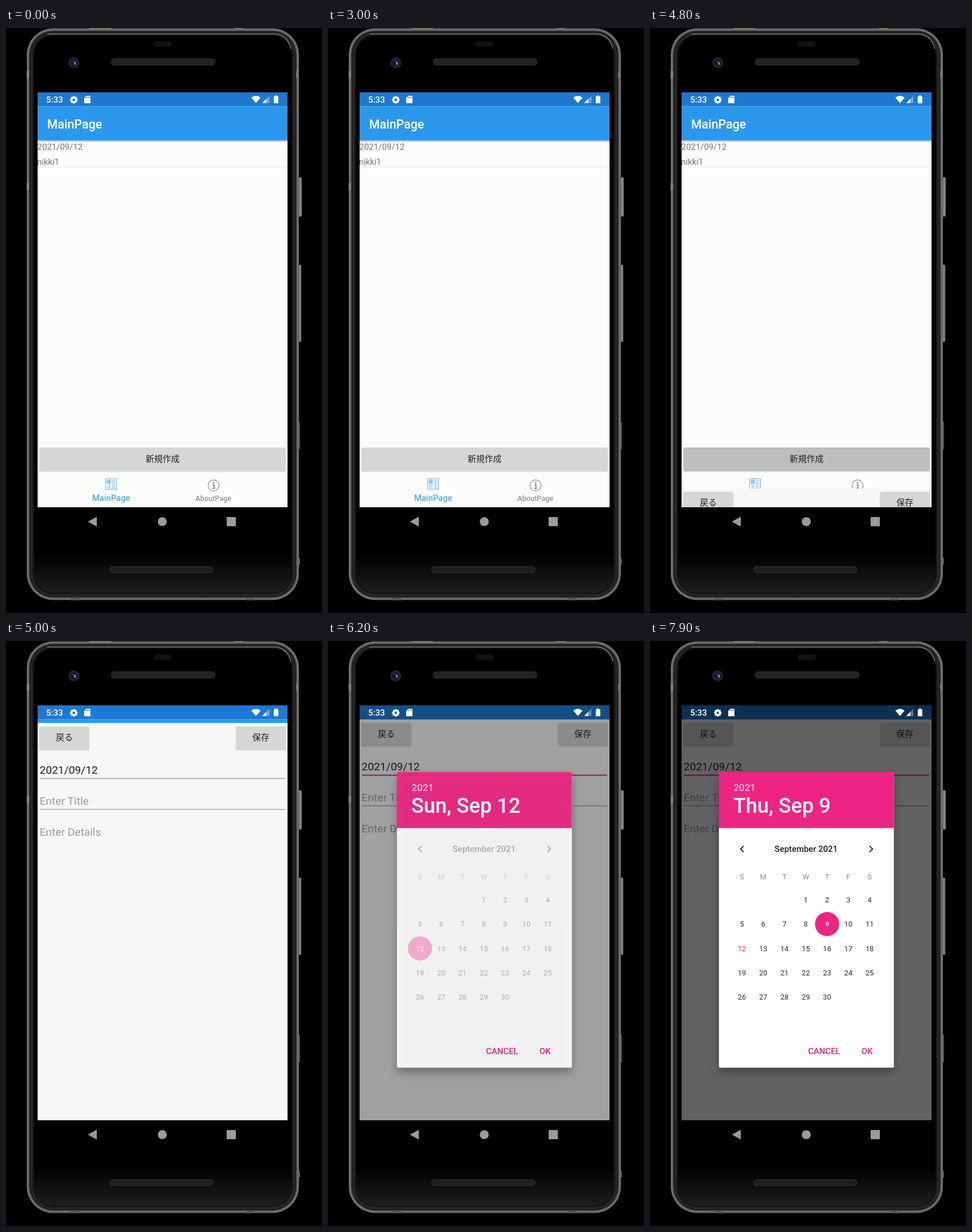
Recreate the animation shown at these times as an HTML page. Size 550 by 1018 pixels, loop 8 s.

```html
<!DOCTYPE html>
<html lang="ja">
<head>
<meta charset="utf-8">
<title>Diary app</title>
<style>
html, body { margin: 0; width: 100%; height: 100%; overflow: hidden; background: #000; }
svg { display: block; width: 100vw; height: 100vh; }
text { font-family: Roboto, "Noto Sans CJK JP", "Noto Sans CJK", sans-serif; white-space: pre; }
.m { font-weight: 500; }
</style>
</head>
<body>
<svg id="stage" viewBox="0 0 550 1018" xmlns="http://www.w3.org/2000/svg">
  <defs>
    <linearGradient id="face" x1="0" x2="0" y1="0" y2="1">
      <stop offset="0" stop-color="#000"/><stop offset=".93" stop-color="#000"/>
      <stop offset="1" stop-color="#1e1e1e"/>
    </linearGradient>
    <linearGradient id="key" x1="0" x2="1" y1="0" y2="0">
      <stop offset="0" stop-color="#3a3a3a"/><stop offset=".5" stop-color="#959595"/>
      <stop offset="1" stop-color="#606060"/>
    </linearGradient>
    <linearGradient id="drop" x1="0" x2="0" y1="0" y2="1">
      <stop offset="0" stop-color="#000" stop-opacity=".32"/>
      <stop offset="1" stop-color="#000" stop-opacity="0"/>
    </linearGradient>
    <filter id="soft" x="-20%" y="-20%" width="140%" height="140%"><feGaussianBlur stdDeviation="8"/></filter>
    <filter id="blur" x="-10%" y="-30%" width="120%" height="160%"><feGaussianBlur stdDeviation="1.2"/></filter>
    <clipPath id="screen"><rect x="55" y="112" width="435" height="722"/></clipPath>
    <clipPath id="body"><rect x="55" y="136.5" width="435" height="697.5"/></clipPath>
  </defs>
  <rect width="550" height="1018" fill="#000"/>
  <g id="phone"></g>
  <g clip-path="url(#screen)">
    <rect x="55" y="112" width="435" height="25" fill="#1f78d0"/>
    <g clip-path="url(#body)">
      <g id="home"></g>
      <g id="edit"></g>
    </g>
    <rect id="dim" x="55" y="112" width="435" height="722" fill="#000"/>
    <g id="status" fill="#fff"></g>
  </g>
  <g id="dialog"></g>
</svg>
<script>
const $ = id => document.getElementById(id);
const PINK = '#ed2582', BLUE = '#2b98ec';

const text = (x, y, size, fill, str, more = '') =>
  `<text x="${x}" y="${y}" font-size="${size}" fill="${fill}" ${more}>${str}</text>`;
const mid = (x, y, size, fill, str, more = '') =>
  text(x, y, size, fill, str, 'text-anchor="middle" ' + more);
const rect = (x, y, w, h, fill, more = '') =>
  `<rect x="${x}" y="${y}" width="${w}" height="${h}" fill="${fill}" ${more}/>`;
const circle = (x, y, r, fill, more = '') =>
  `<circle cx="${x}" cy="${y}" r="${r}" fill="${fill}" ${more}/>`;
const path = (d, more) => `<path d="${d}" ${more}/>`;
const button = (x, y, w, h, label, id = '') =>
  rect(x, y + 1, w, h, '#000', 'rx="2" opacity=".2" filter="url(#blur)"') +
  rect(x, y, w, h, '#d5d6d6', `rx="2" ${id}`) +
  mid(x + w / 2, y + h / 2 + 4.2, 14.8, '#222', label);

// nested rounded frames shade the metal edge of the phone
const ring = (inset, fill) =>
  rect(36 + inset, .5 + inset, 474 - 2 * inset, 995 - 2 * inset, fill, `rx="${46 - inset}"`);
const EDGE = [[0, '#52524e'], [1, '#7b7b76'], [2.5, '#626260'], [4, '#3c3c3b'], [5.5, '#141414'],
  [7, '#2b2b2b'], [9, '#202020'], [11, '#121212'], [13, 'url(#face)']];

$('phone').innerHTML =
  rect(508, 260, 7, 68, 'url(#key)', 'rx="1.5"') +
  rect(508, 412, 6, 134, 'url(#key)', 'rx="1.5"') +
  rect(509, 685, 2.5, 48, '#666') + rect(509, 922, 2.5, 12, '#666') +
  EDGE.map(([inset, fill]) => ring(inset, fill)).join('') +
  path('M72 10.5H470Q490 13 496 36', 'fill="none" stroke="#777" stroke-width="1.4"') +
  rect(145, 0, 38, 2, '#77776a') + rect(398, 0, 15, 3, '#77776a') +
  [75, 270].map(y => rect(36, y, 4, 12, '#858585')).join('') +
  rect(505, 75, 4, 12, '#777') +
  rect(112, 992, 16, 4, '#555548') + rect(418, 992, 14, 4, '#555548') +
  rect(257, 23, 31, 10, '#111116', 'rx="4"') +
  rect(183, 53.5, 181, 11, '#232323', 'rx="5" stroke="#303030"') +
  rect(180.5, 937.5, 180, 10, '#1d1d1d', 'rx="5" stroke="#393939"') +
  circle(118, 60.5, 9.5, '#252528') + circle(118, 60.5, 6, '#11142a') +
  path('M115 57L121 63L122 59Z', 'fill="#5364a8"') + circle(120, 62.5, 1.4, '#a4b0e0') +
  path('M158 850.5V867.5L142.5 859Z', 'fill="#9b9b9b"') +
  circle(272, 859, 7.8, '#9b9b9b') + rect(384, 851, 16, 16, '#9b9b9b', 'rx="1"');

const teeth = [0, 45, 90, 135].map(a =>
  rect(116.3, 118.5, 3.4, 13, '#fff', `rx=".8" transform="rotate(${a} 118 125)"`)).join('');
$('status').innerHTML =
  text(70, 130, 14.8, '#fff', '5:33', 'class="m"') +
  teeth + circle(118, 125, 3.6, 'none', 'stroke="#fff" stroke-width="2.8"') +
  circle(118, 125, 2.2, '#1c66b2') +
  path('M140 118H146Q147 118 147 119V130Q147 131 146 131H137Q136 131 136 130V122Z', '') +
  [139.5, 142, 144.5].map(x => rect(x, 119.5, 1.2, 2.6, '#1c66b2')).join('') +
  path('M427 121.2Q435 114.8 443 121.2L435 130.5Z', '') +
  path('M446 130.5L458.5 118V130.5Z', 'opacity=".35"') +
  path('M446 130.5L453 123.5V130.5Z', '') +
  path('M468 119V117.6H472V119H473Q474 119 474 120V130Q474 131 473 131H467Q466 131 466 130V120Q466 119 467 119Z', '');

const newsIcon =
  rect(173.5, 784.5, 19, 18.5, 'none', 'stroke="#5fb0ec"') +
  rect(176, 787, 6, 5.5, '#8fc6f0', 'stroke="#5fb0ec" stroke-width=".8"') +
  path('M184 787.5H190.5M184 790H190.5M184 792.5H190.5M176 795.5H182M176 798H182M176 800.5H182M184 795.5H190.5M184 798H190.5M184 800.5H190.5',
    'stroke="#5fb0ec" stroke-width=".9" fill="none"');
$('home').innerHTML =
  rect(55, 136, 435, 698, '#fcfdfb') +
  rect(55, 195.5, 435, 4, 'url(#drop)') +
  rect(55, 136, 435, 59.5, BLUE) +
  text(71.5, 174.5, 21.2, '#fff', 'MainPage', 'class="m"') +
  text(54.6, 212, 14.8, '#757575', '2021/09/12') +
  text(54, 238, 14.8, '#757575', 'nikki1') +
  rect(55, 241.5, 435, 1, '#e8e9e4') +
  button(58.5, 730, 428, 41, '新規作成', 'id="create"') +
  newsIcon + mid(183, 823, 14.8, BLUE, 'MainPage') +
  circle(361.3, 796, 9.6, 'none', 'stroke="#8b8b8b" stroke-width="1.1"') +
  circle(361.3, 791.6, 1.3, '#777') +
  path('M359.3 794.8H362V801M359 801H364', 'fill="none" stroke="#777" stroke-width="1.5"') +
  mid(361, 823, 12.7, '#7c7c7c', 'AboutPage');

$('edit').innerHTML =
  rect(55, 136.5, 435, 698, '#f7f7f7') +
  button(58.5, 142.5, 86, 40, '戻る') + button(400.5, 142.5, 86, 40, '保存') +
  text(58.5, 224.7, 19.05, '#222', '2021/09/12') +
  rect(59, 232.5, 426.5, 1.2, '#8f8f8f', 'id="line"') +
  text(58.5, 278.7, 19.05, '#9b9b9b', 'Enter Title') +
  rect(59, 286.3, 426.5, 1.2, '#9090a0') +
  text(58.5, 332.7, 19.05, '#9b9b9b', 'Enter Details');

const colX = i => 160 + 37.05 * i;
const rowY = i => 450.3 + 42.3 * i;
let month = mid(271.7, 367, 14.8, '#222', 'September 2021', 'class="m"') +
  path('M163 356.8L157.6 362L163 367.2M382 356.8L387.4 362L382 367.2',
    'fill="none" stroke="#333" stroke-width="1.9"') +
  circle(colX(0), rowY(2), 21, PINK, 'id="dot12"') +
  circle(colX(4), rowY(1), 21, PINK, 'id="dot9"');
[...'SMTWTFS'].forEach((d, i) => month += mid(colX(i), 415, 12.7, '#8d8d8d', d));
for (let d = 1; d <= 30; d++) {
  const cell = d + 2;
  month += mid(colX(cell % 7), rowY(Math.floor(cell / 7)) + 4.6, 12.7, '#2d2d2d', d, `id="day${d}"`);
}
$('dialog').innerHTML =
  rect(121, 236, 303, 514, '#000', 'opacity=".34" filter="url(#soft)"') +
  `<g id="panel">${rect(120, 228, 304.5, 514.5, '#fdfdfd', 'rx="2"')}
  ${path('M120 325.5V230Q120 228 122 228H422.5Q424.5 228 424.5 230V325.5Z', `fill="${PINK}"`)}</g>` +
  text(145.5, 260.5, 16.9, '#fff', '2021', 'class="m" opacity=".72"') +
  text(145, 298.5, 36, '#fff', '', 'class="m" id="chosen"') +
  `<g id="month">${month}</g>` +
  text(275, 718.5, 14.8, PINK, 'CANCEL', 'class="m"') +
  text(368, 718.5, 14.8, PINK, 'OK', 'class="m"');

const set = (id, name, value) => $(id).setAttribute(name, value);
const clamp = v => Math.max(0, Math.min(1, v));
const ramp = (t, from, to) => clamp((t - from) / (to - from));

function draw(t) {
  set('create', 'fill', t >= 4600 ? '#bcbdbd' : '#d5d6d6');

  // the edit page slides up
  const k = ramp(t, 4765, 5015);
  const rest = (1 + Math.cos(Math.PI * k)) / 2;
  set('edit', 'transform', `translate(0 ${(698 * rest).toFixed(2)})`);
  set('line', 'fill', t >= 5900 ? PINK : '#8f8f8f');
  set('line', 'height', t >= 5900 ? 2 : 1.2);

  // the date picker fades in
  const open = t >= 6200;
  set('dialog', 'display', open ? 'inline' : 'none');
  set('dim', 'opacity', open ? .6 * ramp(t, 6058, 6300) : 0);
  set('panel', 'opacity', .92 + .08 * ramp(t, 6200, 6300));
  set('month', 'opacity', t < 6300 ? .34 : .84 + .16 * ramp(t, 6300, 6500));

  const picked = t >= 7500, touched = t >= 7400;
  $('chosen').textContent = picked ? 'Thu, Sep 9' : 'Sun, Sep 12';
  set('dot12', 'opacity', picked ? 0 : 1);
  set('dot9', 'opacity', picked ? .8 + .2 * ramp(t, 7500, 7900) : touched ? .2 : 0);
  set('day12', 'fill', picked ? PINK : '#fff');
  set('day9', 'fill', picked ? '#fff' : '#2d2d2d');
}

const start = performance.now();
function tick() {
  const t = (performance.now() - start) % 8000;
  draw(Math.floor(t / 100) * 100);
  requestAnimationFrame(tick);
}
tick();
</script>
</body>
</html>
```
